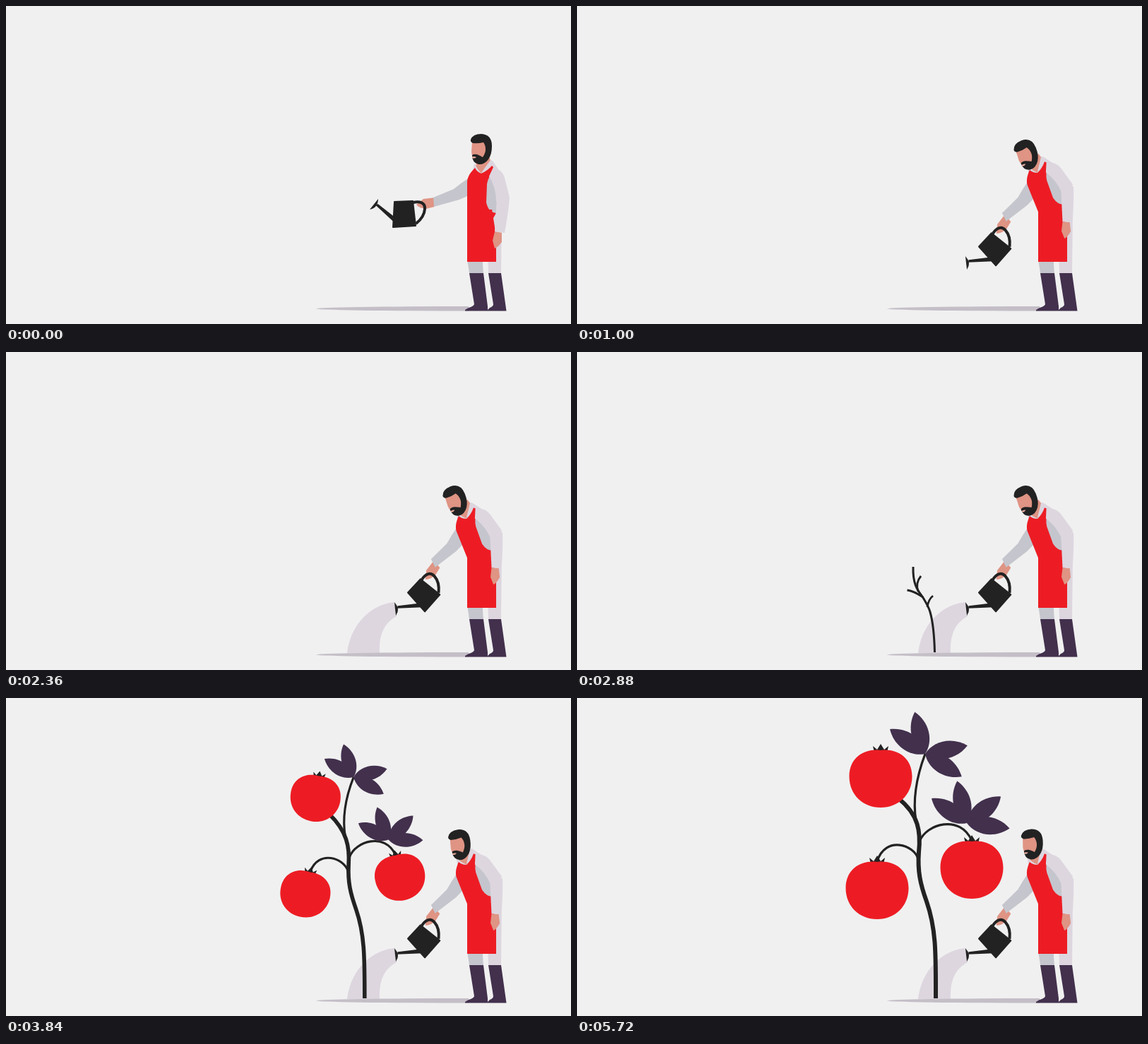
Animation, 800 px wide and 450 px high, one loop 6 s. Source, as an HTML page with a canvas:

```html
<!DOCTYPE html>
<html lang="en">
<head>
<meta charset="utf-8">
<title>Gardener</title>
<style>
html, body { margin: 0; width: 100%; height: 100%; overflow: hidden; background: #f0f0f0; }
canvas { display: block; width: 800px; height: 450px; }
</style>
</head>
<body>
<canvas id="stage"></canvas>
<script>
const LOOP = 6000, STEP = 40;
const INK = '#222222', RED = '#ed1c24', SKIN = '#df9484', PLUM = '#42304d';
const PALE = '#ddd6df', GREY = '#c5c5cd', SHADE = '#c4bec7', PAPER = '#f0f0f0';

const canvas = document.getElementById('stage');
const ctx = canvas.getContext('2d');
const ratio = window.devicePixelRatio || 1;
canvas.width = 800 * ratio;
canvas.height = 450 * ratio;

const mix = (a, b, p) => a + (b - a) * p;
const progress = (t, from, to) => Math.max(0, Math.min(1, (t - from) / (to - from)));
const ease = (t, from, to) => { const u = progress(t, from, to); return u * u * (3 - 2 * u); };
const easeCubic = (t, from, to) => {
  const u = progress(t, from, to);
  return u < .5 ? 4 * u ** 3 : 1 - 4 * (1 - u) ** 3;
};
const rad = deg => deg * Math.PI / 180;

function fill(path, color) {
  ctx.fillStyle = color;
  ctx.fill(new Path2D(path));
}

function line(path, width) {
  ctx.strokeStyle = INK;
  ctx.lineWidth = width;
  ctx.stroke(new Path2D(path));
}

// Draw in a frame whose origin is at x, y.
function placed(x, y, deg, scale, draw) {
  ctx.save();
  ctx.translate(x, y);
  ctx.rotate(rad(deg));
  ctx.scale(scale, scale);
  draw();
  ctx.restore();
}

// Turn a drawing about a joint, keeping stage coordinates.
function turned(x, y, deg, draw) {
  placed(x, y, deg, 1, () => { ctx.translate(-x, -y); draw(); });
}

/* ---------- plant ---------- */

// Blend two paths that share the same commands.
function blend(a, b, p) {
  const ends = b.match(/[\d.]+/g);
  let i = 0;
  return a.replace(/[\d.]+/g, n => mix(+n, +ends[i++], p).toFixed(2));
}
const tipOf = path => path.match(/[\d.]+/g).slice(-2).map(Number);

// Sprout and grown shape of each branch.
const STEM = ['M506.5 425C506 405 504 382 500 368C498 361 495 356 492 351C486 340 475 334 476 304',
  'M508 425C508 365 509 328 495 288C486 263 482 245 484 218C487 190 484 165 455 142'];
const LEFT = ['M490 347C484 343 476 338 467.5 337', 'M483 228C478 208 437 194 425 231'];
const RIGHT = ['M496 361C497 354 499 349 504 345', 'M485 203C494 178 543 164 559 202'];
const TWIG = ['M483 339C480 330 482 323 487 317', 'M480 174C474 138 484 103 493 79'];

const FRUIT = 'M0-40C20-43 44.5-32 44.5-3C44.5 23 25 41 0 41C-25 41-44.5 23-44.5-3C-44.5-32-20-43 0-40Z';
const CROWN = 'M-9-37L-11-46L-5-41L0-49L5-41L11-46L9-37Z';
const LEAF = 'M0 0C.25-.27 .7-.27 1 0C.7 .27 .25 .27 0 0Z';

function spray(x, y, deg, size, angles) {
  placed(x, y, deg, size, () => {
    for (const angle of angles) placed(0, 0, angle, 61, () => fill(LEAF, PLUM));
  });
}

function fruit(x, y, deg, size) {
  placed(x, y, deg, size, () => { fill(CROWN, INK); fill(FRUIT, RED); });
}

function hang([x, y], deg, size) {
  const drop = 41 * size;
  fruit(x - drop * Math.sin(rad(deg)), y + drop * Math.cos(rad(deg)), deg, size);
}

function plant(t) {
  const sprout = ease(t, 2520, 3240), ripe = ease(t, 3240, 4120);
  if (!sprout) return;
  const growth = .42 * Math.max(0, 2 * sprout - 1) + .58 * ripe;
  const size = mix(.16, 1, ripe) * progress(t, 3200, 3280);
  const lean = 1 - ripe;
  const [stem, left, right, twig] = [STEM, LEFT, RIGHT, TWIG].map(([a, b]) => blend(a, b, growth));

  placed(507, 425, 0, Math.min(1, 2 * sprout), () => {
    ctx.translate(-507, -425);
    line(stem, mix(3, 6, growth));
    for (const path of [left, right, twig]) line(path, mix(2.8, 3.2, growth));
  });
  if (!size) return;
  spray(...tipOf(twig), -12 * lean, size, [-104, -145, -11, 32]);
  spray(mix(477, 552, growth), mix(347, 177, growth), -26 * lean, size, [-103, -145, -38, 7]);
  const [x, y] = tipOf(stem);
  fruit(x - 25 * size, y - 28 * size, 40 * lean, size);
  hang(tipOf(left), 55 * lean, size);
  hang(tipOf(right), -50 * lean, size);
}

/* ---------- water ---------- */

function bezier(p, u) {
  const w = 1 - u;
  const axis = k => w ** 3 * p[k] + 3 * w * w * u * p[k + 2] + 3 * w * u * u * p[k + 4] + u ** 3 * p[k + 6];
  return [axis(0), axis(1)];
}

function water(t) {
  const reach = progress(t, 1040, 1400), steps = 30;
  if (!reach) return;
  const upper = [550, 354, 515, 357, 487, 388, 483, 426];
  const lower = [553, 374, 534, 384, 528, 402, 529, 426];
  const shape = new Path2D();
  for (let i = 0; i <= steps; i++) shape.lineTo(...bezier(upper, reach * i / steps));
  for (let i = steps; i >= 0; i--) shape.lineTo(...bezier(lower, reach * i / steps));
  fill(shape, PALE);
}

/* ---------- gardener ---------- */

function can() {
  ctx.lineJoin = 'round';
  line('M13-16C22-18 30-16 29.5-7C29 2 22 10 17 14', 4);
  const body = 'M-13.5-17L12.500-18L16.500 17L-15.500 19Z';
  fill(body, INK);
  line(body, 2);
  fill('M-40-12L-37-14L-14 4V12Z', INK);
  fill('M-36.5-21L-48.5-6Q-37-8-36.5-21Z', INK);
}

function farArm(bend) {
  turned(616.6, 273.3, -23 * bend, () => {
    fill('M608 271L607 284L595 287Q584 286 581 281L591 273Z', SKIN);
    placed(563.5, 294, 0, 1, can);
  });
  fill('M656 243Q645 250 634 259L605 271L606 284L642 274L660 266Z', GREY);
}

function legs() {
  fill('M653 358H675L676 378H656Z', GREY);
  fill('M680 284H702L701 378H683Z', PALE);
  fill('M675 362H680L683 378H676Z', PAPER);
  fill('M656 378H676L682 425V431.500H650V430L655 427Q662 425 663 422Z', PLUM);
  fill('M683 378H701L708.500 431.500H682V430L685 427Q690 425 690 422Z', PLUM);
}

function torso() {
  fill('M664 228L688 218L700 235L702 300L656 296V250Z', PALE);
  fill('M666 218L684 212L687 222L673 237L665 230Z', SKIN);
  fill('M663 222L668 231L673 237L661 232Z', PALE);
  fill('M673 236L686 218L692 223L688 228Z', PALE);
  fill('M684 240Q694 255 695 275L694 294L678 290V250Z', GREY);
  fill('M664 229Q667 235 673 237Q682 233 688 226L692 230Q682 243 681 252L680 278Q683 292 694 293L690 300L653 290V250C653 243 656 237 664 229Z', RED);
}

function nearArm(bend) {
  fill('M690 228Q703 232 706 243L713 271Q704 284 694 276Q694 257 684 241Z', PALE);
  turned(703, 272, 15.5 * bend, () => {
    fill('M692 319L702 321V334Q696 342 692 343L689 332Z', SKIN);
    fill('M713 271Q712 288 706 321L692 319L695 272Z', PALE);
  });
}

function head() {
  fill('M660 192H680V216L661 214Q659 210 659 206Z', SKIN);
  fill('M658 189Q661 181 673 181Q688 182 688 198Q688 210 683 217Q677 225 669 224Q660 222 660 211Q662 209 667 210Q672 212 675 214Q679 208 679 203Q679 197 676 193Q668 195 661 194Q657 192 658 189Z', INK);
  fill('M660 213.500Q663 212.500 666 214Q663 216.500 660 215Z', '#eeb0a4');
}

function gardener(t) {
  const bend = easeCubic(t, 0, 880);
  const look = ease(t, 1320, 1640) - ease(t, 2000, 2400);
  const nod = 17 * ease(t, 3240, 4120) - 3.5 * look;
  const upper = draw => turned(660, 290, -22 * bend, draw);
  upper(() => farArm(bend));
  legs();
  upper(torso);
  fill('M653 290L688 288L694 325V362H653Z', RED);
  upper(() => {
    nearArm(bend);
    ctx.translate(-4 * bend, 5 * bend);
    turned(678, 230, nod, head);
  });
}

function ground() {
  ctx.beginPath();
  ctx.ellipse(655, 428.3, 216, 3.3, 0, Math.PI / 2, Math.PI * 1.5);
  ctx.fillStyle = SHADE;
  ctx.fill();
}

const start = performance.now();
function frame() {
  const now = Math.max(0, performance.now() - start) % LOOP;
  const t = Math.floor(now / STEP) * STEP;
  ctx.setTransform(ratio, 0, 0, ratio, 0, 0);
  ctx.fillStyle = PAPER;
  ctx.fillRect(0, 0, 800, 450);
  water(t);
  ground();
  plant(t);
  gardener(t);
  requestAnimationFrame(frame);
}
frame();
</script>
</body>
</html>
```
